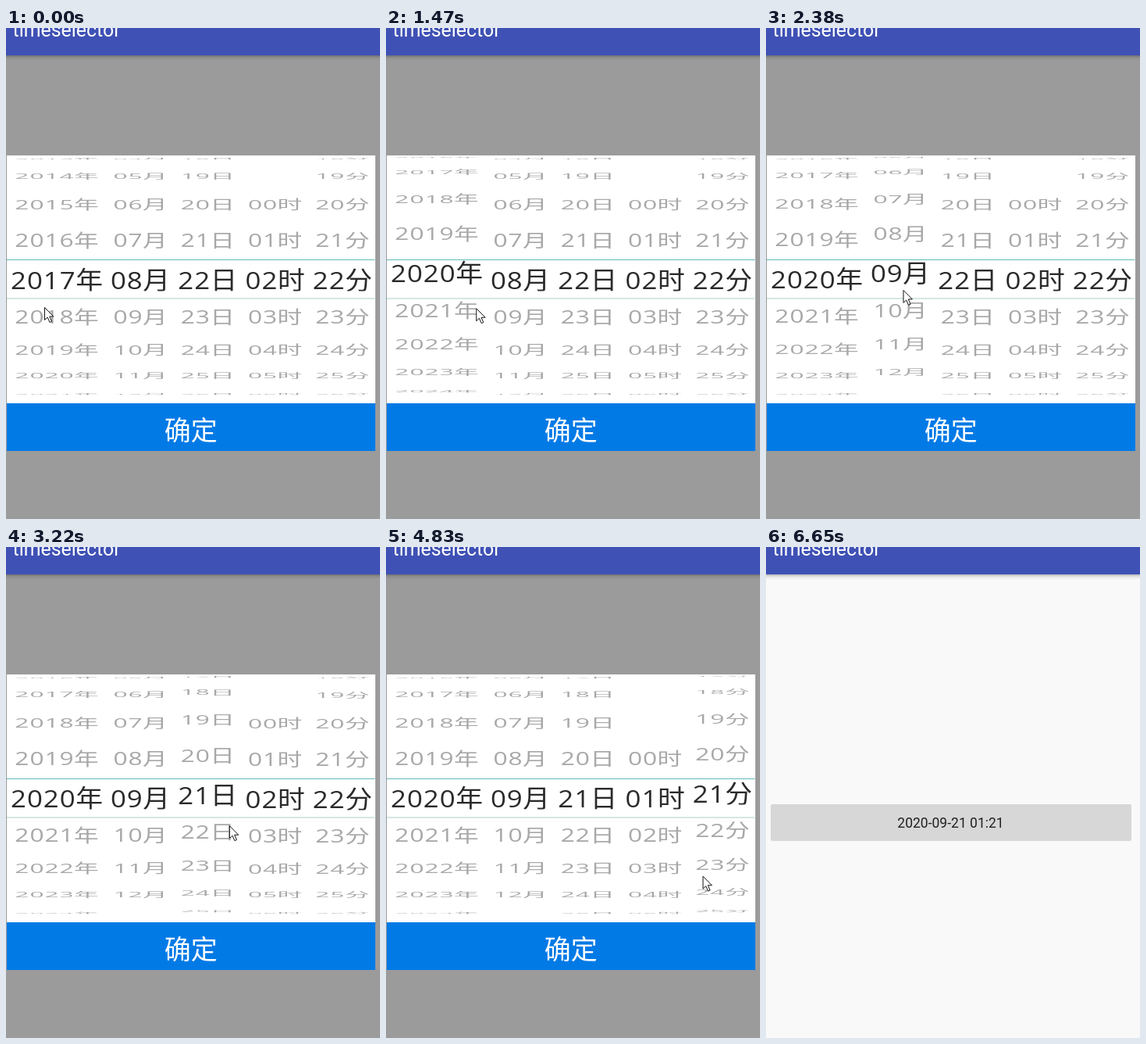
Animation of 479x628 px, one loop 8680 ms. Source, as an HTML page with a canvas:

```html
<!DOCTYPE html>
<html lang="zh">
<head>
<meta charset="utf-8">
<title>timeselector</title>
<style>
html, body { margin: 0; width: 100%; height: 100%; overflow: hidden; background: #f9f9f9; }
#stage { position: relative; width: 479px; height: 628px; overflow: hidden; background: #f9f9f9; }
#stage > *, #dialog > * { position: absolute; }
#bar { left: 0; top: 0; width: 479px; height: 35px; background: #3f51b5; }
#bar span { position: absolute; left: 8.5px; top: -12px; font: 24.9px/30px Roboto, sans-serif; color: #fff; }
#shade { left: 0; top: 35px; width: 479px; height: 7px; background: linear-gradient(rgba(0,0,0,.27), rgba(0,0,0,.07) 45%, transparent); }
#result { left: 6px; top: 329px; width: 462px; height: 47px; border-radius: 2px; background: #d6d7d6;
  font: 17.5px/48px Roboto, sans-serif; color: #212121; text-align: center; text-indent: -1px; }
#dialog { left: 0; top: 35px; width: 479px; height: 593px; background: #9b9b9b; }
#panel { left: 1px; top: 128px; width: 471.5px; height: 317px; background: #fff; }
#ok { left: 1px; top: 445px; width: 471.5px; height: 61px; background: #027ae6; color: #fff;
  font: 34px/65px "Noto Sans CJK SC", "Noto Sans CJK", sans-serif; text-align: center; }
#wheels { left: 0; top: 0; width: 479px; height: 628px; }
#cursor { left: 0; top: 0; width: 14px; height: 22px; overflow: visible; }
</style>
</head>
<body>
<div id="stage">
  <div id="result">2020-09-21 01:21</div>
  <div id="dialog"><div id="panel"></div><div id="ok">确定</div></div>
  <div id="bar"><span>timeselector</span></div>
  <div id="shade"></div>
  <canvas id="wheels"></canvas>
  <svg id="cursor"><path d="M.5 .5V16.5L4.2 13L7 19.4L9.6 18.3L6.8 12H11.9Z" fill="#fff" stroke="#111"/></svg>
</div>
<script>
const LOOP = 8680, STEP = 70, CLOSE = 5880, LEAVE = 6230, SETTLE = 210;
const TOP = 163, R = 158, ANGLE = Math.PI / 10, H = 31, ROW = 49.6;
const FIRST = 133, SECOND = 183, EM = 31.7, LIFT = 3;

const units = ['年', '月', '日', '时', '分'];
const initial = [2017, 8, 22, 2, 22];
const lowest = [2000, 1, 1, 0, 0], highest = [2040, 12, 30, 23, 59];
const centre = i => i ? 85.5 + 86.3 * i : 64.8;

// A drag moves its wheel until `end`; the hand lets go at `release`
const drag = (wheel, start, end, to, x, y, release = end) => ({ wheel, start, end, to, x, y, release });
const drags = [
  drag(0, 70, 630, 2017.72, 49, 357, 700),
  drag(0, 1190, 1470, 2020.17, 52, 375, 1330),
  drag(1, 1890, 2380, 9.17, 171.5, 393),
  drag(2, 2800, 3150, 21.1, 250, 325),
  drag(3, 3570, 3850, 1.1, 341, 333),
  drag(4, 4340, 4900, 21.1, 402, 378)
];
const button = { start: 5600, x: 236.5, y: 505 };

const clamp = u => Math.min(1, Math.max(0, u));
const mix = (a, b, u) => a + (b - a) * u;
const smooth = u => u * u * (3 - 2 * u);
const easeOut = u => 1 - (1 - u) ** 2.5;

// Follows the drags, each one settling on the nearest row
function valueAt(wheel, t) {
  let v = initial[wheel];
  for (const d of drags) {
    if (d.wheel !== wheel || t <= d.start) continue;
    v = mix(v, d.to, smooth(clamp((t - d.start) / (d.end - d.start))));
    v = mix(v, Math.round(d.to) + 0.02, smooth(clamp((t - d.end - STEP) / SETTLE)));
  }
  return v;
}

// The hand moves with the dragged row, then glides to the next drag
function held(d, t) {
  const moved = valueAt(d.wheel, Math.min(t, d.end)) - valueAt(d.wheel, d.start);
  return [d.x + 4 * clamp((t - d.start) / (d.release - d.start)), d.y - moved * ROW];
}

function pointerAt(t) {
  if (t >= LEAVE) return [button.x + 0.45 * (t - LEAVE), button.y + 0.3 * (t - LEAVE)];
  const i = Math.max(0, drags.findLastIndex(d => d.start <= t));
  const d = drags[i], next = drags[i + 1] || button;
  const [x, y] = held(d, Math.min(Math.max(t, d.start), d.release));
  const u = easeOut(clamp((t - d.release) / (next.start - d.release)));
  return [mix(x, next.x, u), mix(y, next.y, u)];
}

const $ = id => document.getElementById(id);
const canvas = $('wheels'), ctx = canvas.getContext('2d');
const dpr = window.devicePixelRatio || 1;
canvas.width = 479 * dpr;
canvas.height = 628 * dpr;

// Fixed-pitch digits followed by a full-width unit
function label(digits, unit) {
  const pitch = EM * 0.6, left = -(digits.length * pitch + EM) / 2;
  ctx.font = `${EM}px "Open Sans", "Noto Sans", sans-serif`;
  [...digits].forEach((d, i) => ctx.fillText(d, left + (i + 0.5) * pitch, 0));
  ctx.font = `${EM}px "Noto Sans CJK SC", "Noto Sans CJK", sans-serif`;
  ctx.fillText(unit, left + digits.length * pitch + EM / 2, 0);
}

function slice(from, to, s, active, digits, unit) {
  ctx.save();
  ctx.beginPath();
  ctx.rect(-90, from, 180, to - from);
  ctx.clip();
  ctx.scale(1, active ? s : s * 0.8);
  ctx.translate(0, active ? H - LIFT : H);
  if (active) ctx.scale(1.1, 1);
  ctx.fillStyle = active ? '#2a2a2a' : '#a8a8a8';
  label(digits, unit);
  ctx.restore();
}

// Row k steps from the middle of the drum, split where it crosses a line
function drawRow(wheel, n, k) {
  const a = k * ANGLE, s = Math.cos(a);
  if (s < 0.02) return;
  const y = R + R * Math.sin(a) - s * H / 2;
  const digits = String(n).padStart(wheel ? 2 : 4, '0');
  const part = (from, to, active) => slice(from, to, s, active, digits, units[wheel]);
  ctx.save();
  ctx.translate(centre(wheel), TOP + y);
  ctx.scale(1, s);
  if (y <= FIRST && y + H >= FIRST) {
    part(0, FIRST - y, false);
    part(FIRST - y, ROW, true);
  } else if (y <= SECOND && y + H >= SECOND) {
    part(0, SECOND - y, true);
    part(SECOND - y, ROW, false);
  } else {
    const active = y >= FIRST && y + H <= SECOND;
    part(0, active ? H : ROW, active);
  }
  ctx.restore();
}

function drawWheels(t) {
  ctx.setTransform(dpr, 0, 0, dpr, 0, 0);
  ctx.clearRect(0, 0, 479, 628);
  ctx.textAlign = 'center';
  ctx.fillStyle = '#62b9b4';
  ctx.fillRect(1, 296, 471.5, 1);
  ctx.fillStyle = '#aacfce';
  ctx.fillRect(1, 345.5, 471.5, 1);
  units.forEach((_, i) => {
    const v = valueAt(i, t);
    const last = Math.min(highest[i], v + 5);
    for (let n = Math.max(lowest[i], Math.ceil(v - 5)); n <= last; n++) drawRow(i, n, n - v);
  });
}

const start = performance.now();
let last = -1;
function frame() {
  const t = Math.floor((performance.now() - start) % LOOP / STEP) * STEP;
  if (t !== last) {
    last = t;
    const open = t < CLOSE;
    $('dialog').style.display = canvas.style.display = open ? 'block' : 'none';
    if (open) drawWheels(t);
    const [x, y] = pointerAt(t);
    $('cursor').style.transform = `translate(${x}px, ${y}px)`;
  }
  requestAnimationFrame(frame);
}
frame();
</script>
</body>
</html>
```
